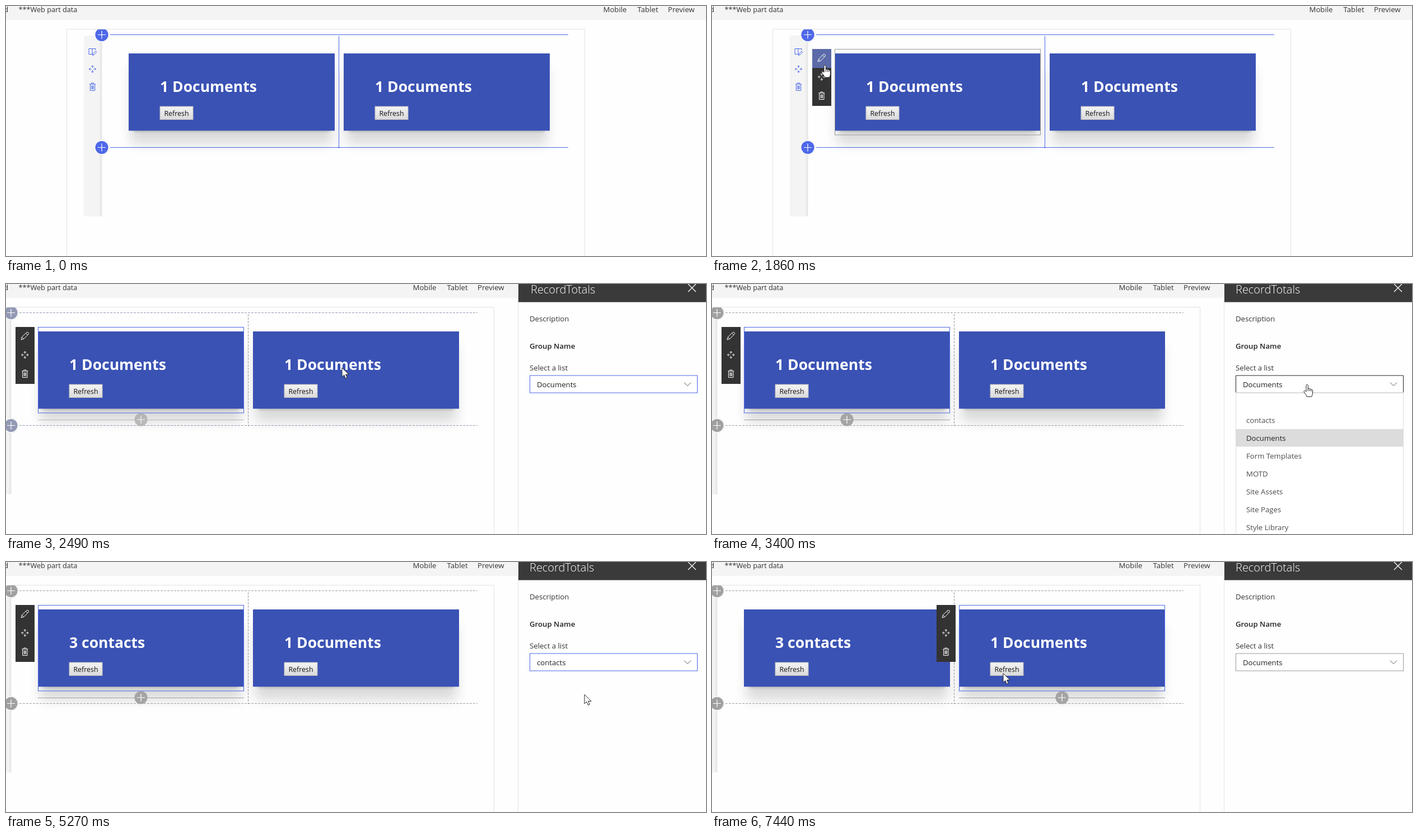
Recreate the animation shown at these times as an HTML page. Size 1250 px wide and 448 px high, loop 8000 ms.

```html
<!DOCTYPE html>
<html lang="en">
<head>
<meta charset="utf-8">
<title>Web part editor</title>
<style>
  html, body { margin: 0; width: 100%; height: 100%; overflow: hidden; background: #fefefe; }
  svg { display: block; width: 100vw; height: 100vh; }
  text { font: 13.2px "Open Sans", "Noto Sans", sans-serif; fill: #333; white-space: pre; }
  .small { font-size: 12.7px; }
  .button { font-size: 12.4px; fill: #111; text-anchor: middle; }
  .heading { font-size: 26.5px; font-weight: 700; fill: #fff; }
  .group { font-weight: 600; fill: #222; }
  .title { font-size: 20px; font-weight: 300; fill: #fff; }
  .item { fill: #4c4c4c; }
  .dark { fill: #212121; }
  .wide { filter: blur(11px); }
  .tight { filter: blur(2px); }
  .line { fill: none; }
</style>
</head>
<body>
<svg id="stage" viewBox="0 0 1250 448" preserveAspectRatio="none"></svg>
<script>
const BLUE = '#4a67e6', GREY = '#a0a0a0';
const LOOP = 8000;

const icons = {
  pencil: 'M-6.8 6.8-5.4 2 3.2-6.4Q4.8-7.2 6-6T6.4-3.2L-2 5.4zM-5.4 2-2 5.4M1.6-4.8 4.8-1.6',
  move: 'M0-6V-2M0 6V2M-6 0H-2M6 0H2M-2.2-4 0-6.2 2.2-4M-2.2 4 0 6.2 2.2 4M-4-2.2-6.2 0-4 2.2M4-2.2 6.2 0 4 2.2',
  trash: 'M-5.5-5H5.5M-2-5V-7H2V-5M-4.2-5V6.5H4.2V-5M-1.7-2.5V4.3M0-2.5V4.3M1.7-2.5V4.3',
  columns: 'M-6.5-5.5H-.5V4.5H-6.5zM-.5-5.5H5.5V-3M-.5 4.5H1M0 6.5 .8 3.5 5.5-1.2 7.3 .6 2.8 5.5z',
  plus: 'M-7 0H7M0-7V7',
  close: 'M-7-7 7 7M7-7-7 7',
  chevron: 'M-6-3 0 3 6-3'
};
const pointers = {
  arrow: 'M0 0V16.5L3.8 12.9 6.4 19 9.2 17.8 6.6 12H12z',
  hand: 'M-2 1.8C-2-.4 1.3-.4 1.3 1.8V8C1.8 6.5 4.3 6.6 4.3 8.5 5 7.4 7 7.7 7 9.6 7.8 8.6 9.6 9.2 9.6 11V15Q9.6 18 7.6 22H-.8Q-1.5 19-5.6 14C-7 11.6-4.5 10.2-3.2 11.8L-2 13z'
};

// Each step keeps everything it does not mention.
const steps = [
  { at: 0, shift: 0, nav: 0, solid: true, lineColor: BLUE, discs: '#4e68e8', rule: BLUE,
    count: '1 Documents', left: null, right: null, panel: null, pointer: null },
  { at: 900, pointer: ['arrow', 477, 303] },
  { at: 1220, left: { bar: '#585858', border: '#999' }, pointer: ['arrow', 236, 138.5] },
  { at: 1540, left: { bar: '#333', border: '#999' }, pointer: ['arrow', 207, 125] },
  { at: 1860, left: { bar: '#333', border: '#999', hover: true }, pointer: ['hand', 202, 106] },
  { at: 2180, shift: -94.5, nav: -198, solid: false, lineColor: '#6d82e8', discs: '#566fe2', rule: '#999',
    left: { bar: '#333', border: '#999', hover: true, add: .12 },
    panel: { x: 1057, content: 1057, width: 158, value: '', border: BLUE } },
  { at: 2490, shift: -162, nav: -340, lineColor: '#959ab0', discs: '#9299b4',
    left: { bar: '#333', border: BLUE, add: .7 }, pointer: ['arrow', 600, 150],
    panel: { x: 915, content: 935, width: 300, value: 'Documents', titleShift: 2 } },
  { at: 2780, lineColor: GREY, discs: GREY, left: { bar: '#333', border: BLUE, add: 1 },
    pointer: ['arrow', 998, 158], panel: { titleShift: 0 } },
  { at: 3100, pointer: ['hand', 1063, 180] },
  { at: 3400, panel: { border: '#222', list: true, drop: 0 } },
  { at: 3710, panel: { drop: 1 }, pointer: ['hand', 1062, 186] },
  { at: 4030, panel: { border: BLUE }, pointer: ['hand', 1061, 198] },
  { at: 4340, pointer: ['hand', 1033, 238] },
  { at: 4640, panel: { active: true } },
  { at: 4960, panel: { list: false }, pointer: ['arrow', 1033, 237.5] },
  { at: 5270, count: '3 contacts', panel: { value: 'contacts' } },
  { at: 5890, pointer: ['arrow', 921, 237.5] },
  { at: 6200, pointer: ['arrow', 790, 220] },
  { at: 6520, right: { bar: '#333', border: '#999' }, pointer: null },
  { at: 6840, pointer: ['arrow', 520, 199.5] },
  { at: 7150, left: null, right: { bar: '#333', border: BLUE, add: .85 },
    panel: { value: 'Documents', border: '#999' } },
  { at: 7440, right: { bar: '#333', border: BLUE, add: 1 } }
];

let previous = {};
const states = steps.map(step => {
  const panel = step.panel ? { ...previous.panel, ...step.panel } : previous.panel;
  return previous = { ...previous, ...step, panel };
});

const text = (x, y, label, kind = '') => `<text x="${x}" y="${y}" class="${kind}">${label}</text>`;
const rect = (x, y, w, h, fill, extra = '') =>
  `<rect x="${x}" y="${y}" width="${w}" height="${h}" fill="${fill}" ${extra}/>`;
const frame = (x, y, w, h, color) => rect(x + .5, y + .5, w - 1, h - 1, 'none', `stroke="${color}"`);
const path = (d, color, extra = '') => `<path class="line" d="${d}" stroke="${color}" ${extra}/>`;
const icon = (name, x, y, color, width = 1) =>
  path(icons[name], color, `stroke-width="${width}" transform="translate(${x} ${y})"`);

const disc = (x, y, color, halo = true) =>
  (halo ? `<circle cx="${x}" cy="${y}" r="13.5" fill="#fff" stroke="#ececec"/>` : '') +
  `<circle cx="${x}" cy="${y}" r="11.6" fill="${color}"/>` + icon('plus', x, y, '#fff', 1.2);

function card(x, label, edit) {
  let out = rect(x + 4, 112, 360, 135, '#000', 'class="wide" opacity=".14"') +
    rect(x + 9, 120, 350, 106, '#000', 'class="tight" opacity=".13"');
  if (edit) out += rect(x, 77, 368, 8, '#fff');
  out += rect(x, 85, 368, 138.5, '#3a52b4') + text(x + 56, 154, label, 'heading') +
    rect(x + 56, 180, 59, 23.5, 'url(#button)', 'stroke="#bcbcbc"') +
    text(x + 85.5, 197, 'Refresh', 'button');
  return out;
}

function controls(x, edit) {
  if (!edit) return '';
  const bar = x - 40, middle = bar + 16.8;
  let out = frame(x, 77, 368, 154.5, edit.border) + rect(bar, 77, 34, 102, edit.bar);
  if (edit.hover) out += rect(bar, 77, 34, 34, '#5b6aa8');
  out += icon('pencil', middle, 93, '#fff') + icon('move', middle, 127, '#fff') +
    icon('trash', middle, 161, '#fff');
  if (edit.add) {
    const line = edit.add > .5 ? path(`M${x} 243.5H${x + 368}`, GREY) : '';
    out += `<g opacity="${edit.add}">${line}${disc(x + 184, 243, '#a4a4a4', false)}</g>`;
  }
  return out;
}

function page(s) {
  const dash = s.solid ? '' : 'stroke-dasharray="4 2"';
  return `<g transform="translate(${s.shift})">` +
    frame(108, 41, 926, 500, '#e3e3e3') +
    '<g clip-path="url(#page)">' +
    rect(139, 53, 32, 324, '#f4f4f4') + rect(166, 53, 6, 324, 'url(#edge)') +
    icon('columns', 154.5, 82, BLUE) + icon('move', 154.5, 113, BLUE) +
    icon('trash', 154.5, 145, BLUE) +
    card(219, s.count, s.left) + card(603, '1 Documents', s.right) +
    path('M186 51.5H1004M186 253.5H1004', s.lineColor, dash) +
    path('M594.5 54V255', s.rule, dash) +
    disc(171, 51.5, s.discs) + disc(171, 253.5, s.discs) +
    controls(219, s.left) + controls(603, s.right) + '</g></g>';
}

function header(nav) {
  return rect(0, 0, 1250, 25, '#f4f4f4') + text(-4, 11, 'd') +
    text(22.5, 11, '***Web part data', 'small') +
    text(1066.5 + nav, 11, 'Mobile') + text(1127.5 + nav, 11, 'Tablet') +
    text(1182 + nav, 11, 'Preview');
}

function options(p) {
  const labels = ['contacts', 'Documents', 'Form Templates', 'MOTD', 'Site Assets', 'Site Pages', 'Style Library'];
  const items = labels.map((label, i) => {
    const dark = i === 1 || (i === 0 && p.active);
    return text(954, 249 + p.drop + 32 * i, label, dark ? 'dark' : 'item');
  });
  return rect(935.5, 195.5, 299, 270, '#fff', 'stroke="#ddd"') +
    rect(936, 260 + p.drop, 298, 31.5, '#dcdcdc') + items.join('');
}

function panel(p) {
  if (!p) return '';
  const { x, content } = p;
  return rect(x - 1, 0, 1, 448, '#e4e4e4') + rect(x, 0, 1250 - x, 448, '#fefefe') +
    rect(x, 0, 1250 - x, 32.5, '#3a3a3a') +
    text(x + 20 + (p.titleShift || 0), 17, 'RecordTotals', 'title') +
    icon('close', 1225, 7, '#fff', 1.3) +
    text(content, 67, 'Description') + text(content, 116, 'Group Name', 'group') +
    text(content, 155, 'Select a list') +
    (p.list ? options(p) : '') +
    rect(content + .5, 163.5, p.width - 1, 31.5, '#fff') +
    (p.list ? path(`M${content + .5} 195V164H${content + p.width - .5}V195`, p.border) +
        path(`M${content} 194.5H${content + p.width}`, '#d8d8d8')
      : frame(content, 163.5, p.width, 32, p.border)) +
    text(content + 13, 185, p.value, 'dark') +
    icon('chevron', content + p.width - 18, 179.5, '#555');
}

function pointer(spec) {
  if (!spec) return '';
  const [kind, x, y] = spec;
  const place = `transform="translate(${x} ${y})"`;
  return `<path d="${pointers[kind]}" ${place} fill="#fff" stroke="#222" stroke-linejoin="round"/>` +
    (kind === 'hand' ? path('M1.3 8V12M4.3 9V12M7 10V12.5', '#222', place) : '');
}

const defs = `<defs>
  <linearGradient id="button" x2="0" y2="1"><stop stop-color="#f4f4f4"/><stop offset="1" stop-color="#dadada"/></linearGradient>
  <linearGradient id="edge"><stop stop-color="#f4f4f4"/><stop offset=".75" stop-color="#e6e6e6"/><stop offset="1" stop-color="#fafafa"/></linearGradient>
  <clipPath id="page"><rect x="0" y="42" width="1500" height="406"/></clipPath>
</defs>`;

const stage = document.getElementById('stage');
let shown;
function draw() {
  const time = performance.now() % LOOP;
  const state = states.findLast(s => s.at <= time);
  if (state !== shown) {
    stage.innerHTML = defs + rect(0, 0, 1250, 448, '#fefefe') + header(state.nav) +
      page(state) + panel(state.panel) + pointer(state.pointer);
    shown = state;
  }
  requestAnimationFrame(draw);
}
draw();
</script>
</body>
</html>
```
